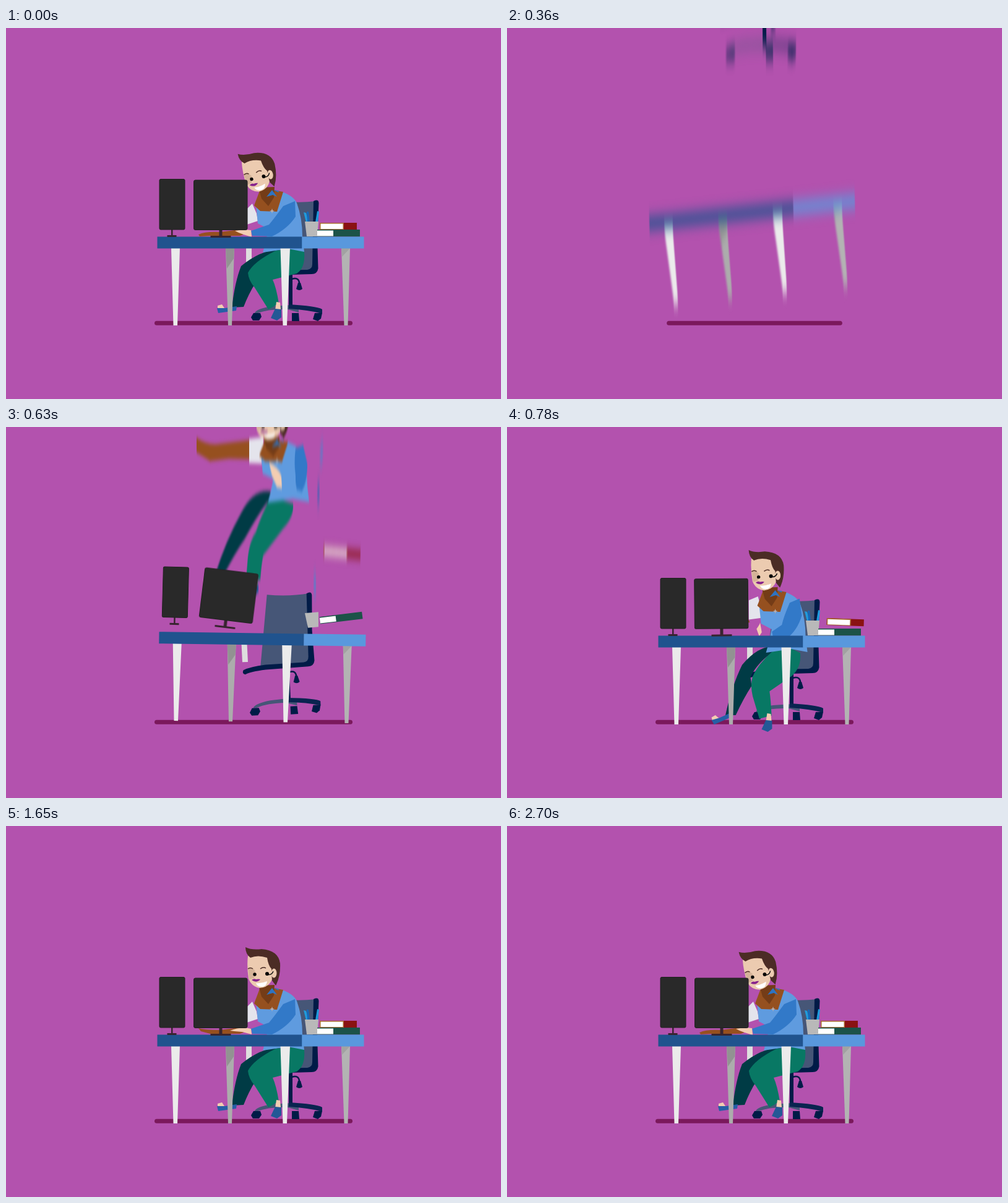
Recreate the animation shown at these times as an HTML page. Size 800 by 600 pixels, loop 2.73 s.

```html
<!DOCTYPE html>
<html lang="en">
<head>
<meta charset="utf-8">
<title>Desk drop</title>
<style>
html, body { margin: 0; width: 100%; height: 100%; overflow: hidden; background: #b352ae; }
svg { display: block; width: 100vw; height: 100vh; }
</style>
</head>
<body>
<svg viewBox="0 0 800 600">
  <rect width="800" height="600" fill="#b352ae"/>
  <path id="ground" stroke="#7b195c" stroke-width="7" stroke-linecap="round"/>

  <g id="chair">
    <path d="M388 352h9v34h-9z" fill="#dedede"/>
    <path d="M433 279Q470 284 501 280L498 394 417 394Z" fill="#465677"/>
    <path d="M497 280Q505 276 505.500 283L503 340 504.500 389Q503 398 494 398L425 400Q400 402 392 406 386 405 389 399 400 394 425 392L487 391Q495 390 495 382Z" fill="#001b47"/>
    <path d="M457 397h6v56h-6z" fill="#001b47"/>
    <path d="M462 406Q475 402 474 416" fill="none" stroke="#001b47" stroke-width="2.500"/>
    <path d="M472 412h4l3 10q-5 4-10 0z" fill="#001b47"/>
    <path d="M402 461Q404 454 430 450L460 448 473 452 473 460 455 455Q425 454 407 461Z" fill="#465677"/>
    <path d="M457 447Q505 450 511 455L511 462Q490 456 457 454Z" fill="#0a2450"/>
    <g fill="#001b47">
      <path d="M400 461h11l2 6-4 6h-10l-3-5z"/>
      <path d="M462 461h11l1 13h-12z"/>
      <path d="M499 461h12l-2 9-5 4-8-3z"/>
    </g>
  </g>

  <g id="man">
    <path id="farLeg" fill="#003b45"/>
    <g id="farFoot">
      <path d="M342 449l7-2 4 6-11 1z" fill="#f3cdb2"/>
      <path d="M341 453L354 453 373 450 372 457 343 461Z" fill="#265fa5"/>
    </g>
    <path id="nearLeg" fill="#087864"/>
    <g id="nearFoot">
      <path d="M437 443l6 1 1 11-9 1z" fill="#f3cdb2"/>
      <path d="M428 469L435 454 445 455 445 468 438 473Z" fill="#235896"/>
    </g>
    <path id="foreArm" fill="#96501f"/>
    <path id="cuff" fill="#e4e4ec"/>
    <g id="torso">
      <path d="M404 286L440 263Q464 270 470 283 479 308 479 337L482 362 456 357 415 363 420 345 424 325 407 316Z" fill="#5f9bdf"/>
      <path d="M412 258L448 265 438 297 411 296 401 287Z" fill="#95501f"/>
      <path d="M408 258L434 257 433 274 424 288 413 276Z" fill="#743c17"/>
      <path d="M421 273l9-11 8 11-7-3zM432 262l8 1 1 3z" fill="#2e74c2"/>
      <path d="M430 292l1 3 3 1-3 1-1 3-1-3-3-1 3-1z" fill="#b9b0b0"/>
    </g>
    <path id="sleeve" fill="#3279c8"/>
    <path id="hand" fill="#f3cdb2"/>
    <g id="head">
      <path d="M391 210Q408 202 429 214L430 248Q425 261 410 262 397 260 392 247Q389 227 391 210Z" fill="#eccbb0"/>
      <path d="M391 230Q400 228 403 236L401 246 393 248Z" fill="#d4b398"/>
      <path d="M387 196Q397 201 413 199 440 201 443 222 444 243 436 258L430 250 429 231Q424 226 422 213 407 208 395 213 387 207 387 196Z" fill="#4b2c25"/>
      <ellipse cx="433" cy="238" rx="4.500" ry="7.500" fill="#eccbb0"/>
      <path d="M391 231q4-3 8 0M411 231q5-4 9-1" fill="none" stroke="#4b2c25" stroke-width="1.500"/>
      <path d="M422 240q7 2 10-5" fill="none" stroke="#111" stroke-width="1.500"/>
      <circle cx="422" cy="239" r="3"/>
      <circle cx="402" cy="240" r="2.700"/>
      <path d="M397 249q4-3 7-1 4-1 7 0-6 7-14 1z" fill="#87238c"/>
      <path d="M404 254q9 1 18-3-1 9-9 9-7 0-9-6z" fill="#fff"/>
    </g>
  </g>

  <g id="pen1"><path d="M481 298l4 1 4 15h-4z" fill="#1f9bdc"/></g>
  <g id="pen2"><path d="M486 297l3 0 2 17h-4z" fill="#1667b8"/></g>
  <g id="pen3"><path d="M503 296l3 1-2 17h-4z" fill="#1f9bdc"/></g>
  <g id="cup"><path d="M483 313h22l-2 24h-17z" fill="#b9b9b9"/></g>
  <g id="green">
    <path d="M503 326h69v11.500h-69z" fill="#1c5348"/>
    <path d="M503 327.500h26v9h-26z" fill="#fff"/>
  </g>
  <g id="red">
    <path d="M507 315h60v11h-60z" fill="#8a1212"/>
    <path d="M507 315h39v11h-39z" fill="#a8662e"/>
    <path d="M508.500 316.500h36v8.500h-36z" fill="#fff"/>
  </g>

  <g id="desk">
    <path d="M355 356h14l-4 125h-6z" fill="#acacac"/>
    <path d="M355 356h14l-1 17-11 16z" fill="#929292"/>
    <path d="M542 356h14l-3.500 125h-6z" fill="#b3b3b3"/>
    <path d="M543 370l13-14-14 0z" fill="#a2a2a2"/>
    <path d="M267 356h14l-4 125h-6.500zM443.500 356h15.500l-5 125h-6.500z" fill="#ebebeb"/>
    <path d="M244.500 337.500h234v19h-234z" fill="#20538e"/>
    <path d="M478.500 337.500h100v19h-100z" fill="#5998dd"/>
  </g>
  <g id="side">
    <path d="M267 325h2.500v10h6v3h-15v-3h6.500z" fill="#38242f"/>
    <rect x="248" y="244.500" width="41" height="81.500" rx="2" fill="#292929" stroke="#202020"/>
  </g>
  <g id="screen">
    <path d="M344.500 326h5v10h14v3h-33v-3h14z" fill="#38242f"/>
    <rect x="303.500" y="246" width="86.500" height="80.500" rx="2.500" fill="#292929" stroke="#202020"/>
  </g>
</svg>
<script>
const LOOP = 2730;
const NS = 'http://www.w3.org/2000/svg';
const el = id => document.getElementById(id);
const clamp = v => Math.max(0, Math.min(1, v));
const smooth = v => v * v * (3 - 2 * v);
const ramp = (t, a, b) => smooth(clamp((t - a) / (b - a)));
const svg = document.querySelector('svg');

// Each part: pivot, motion blur strength, then keys of [time, x, y, angle].
const parts = {
  desk: { pivot: [411, 480], blur: 4, keys: [[185, -2, -542, -8.5], [373, -1, -16, -6], [450, 1, -2, 0], [540, 2, -9, 2.4], [630, 1, -4, .8], [720, 0, 0, 0]] },
  chair: { pivot: [455, 470], blur: 4, keys: [[340, -49, -490, 0], [495, -8, -10, -5], [630, -2, -9, -2.8], [750, 0, 0, 0]] },
  side: { pivot: [268, 337], blur: 4, keys: [[420, -6, -400, -6], [570, 0, -4, -2], [630, 4, -18, 1.5], [720, 1, -2, -1], [780, 0, 0, 0]] },
  screen: { pivot: [347, 337], blur: 4, keys: [[420, -6, -400, -6], [570, 2, -6, 0], [630, 7, -14, 7], [720, 0, -2, -2], [810, 0, 0, 0]] },
  man: { pivot: [430, 360], blur: 1.8, keys: [[470, 0, -565, 0], [748, 0, -5, 0], [790, 0, 3, 0], [880, 0, 0, 0]] },
  cup: { pivot: [494, 337], blur: 4, keys: [[450, 0, -430, -10], [600, 2, -16, -7], [630, 2, -13, -5], [700, 0, 0, 0]] },
  green: { pivot: [537, 331], blur: 4, keys: [[450, 8, -480, -14], [600, 3, -30, -9], [630, 4, -23, -7], [700, 0, 0, 0]] },
  red: { pivot: [537, 320], blur: 4, keys: [[480, 0, -419, 4], [680, 8, -19, 7], [720, 20, -10, 4], [840, 0, 0, 0]] },
  pen1: { pivot: [486, 312], blur: 4, keys: [[500, 20, -522, 14], [645, 12, 0, 14], [720, 0, 0, 0]] },
  pen2: { pivot: [489, 312], blur: 4, keys: [[550, 24, -490, 10], [686, 10, 0, 8], [750, 0, 0, 0]] },
  pen3: { pivot: [503, 312], blur: 4, keys: [[565, 8, -500, 6], [704, 4, 0, 4], [770, 0, 0, 0]] }
};

// Pairs of matching paths: seated, falling.
const legs = {
  nearLeg: [
    'M436 360Q400 378 391 396Q392 408 402 420L424 455L441 446Q437 420 431 407L470 397Q484 388 482 362L478 357Z',
    'M426 357Q412 385 404 410Q394 425 391 450L388 488L411 488Q413 460 416 448L448 405Q466 385 464 365L440 357Z'],
  farLeg: [
    'M443 357Q410 360 380 385Q370 410 365 452L384 451Q392 430 404 411L392 400Q400 380 440 361Z',
    'M428 345Q400 340 380 380Q355 425 338 480L352 480Q370 445 385 423L395 405Q412 375 428 355Z'],
  cuff: [
    'M398 284L389 293L389 318L407 312L405 300Z',
    'M415 257L393 260L393 299L416 300L418 280Z'],
  sleeve: [
    'M467 280L448 288Q432 310 425 318L396 328L398 336L430 337Q455 325 468 305Z',
    'M480 270L468 275Q465 300 468 318L468 330L470 342L478 345Q487 330 487 300Z']
};
const arms = {
  foreArm: [
    'M311 334Q322 329 345 330L378 326L392 331L378 336L330 336L313 337Z',
    'M311 327Q322 330 345 330L378 326L392 331L378 336L330 336L315 332Z',
    'M308 258Q325 271 345 268L393 262L393 293L360 292L330 296L308 282Z'],
  hand: [
    'M396 327Q385 325 370 328L376 331L384 334L397 338Z',
    'M396 328Q380 324 362 331L370 332L382 333L397 337Z',
    'M425 298Q440 305 445 320L446 340L438 338L430 320Z']
};

function mix(a, b, w) {
  const nums = b.match(/-?[\d.]+/g);
  let i = 0;
  return a.replace(/-?[\d.]+/g, n => +n + (nums[i++] - n) * w);
}

// Straight fall first, eased bounces afterwards.
function pose(keys, t) {
  if (t <= keys[0][0]) return keys[0].slice(1);
  const i = keys.findIndex(k => k[0] > t);
  if (i < 0) return [0, 0, 0];
  const a = keys[i - 1], b = keys[i];
  let p = (t - a[0]) / (b[0] - a[0]);
  if (i > 1) p = smooth(p);
  return [1, 2, 3].map(j => a[j] + (b[j] - a[j]) * p);
}

for (const id in parts) {
  const filter = document.createElementNS(NS, 'filter');
  const attrs = { id: 'blur-' + id, filterUnits: 'userSpaceOnUse', x: 0, y: -100, width: 800, height: 800, 'color-interpolation-filters': 'sRGB' };
  for (const k in attrs) filter.setAttribute(k, attrs[k]);
  const blur = document.createElementNS(NS, 'feGaussianBlur');
  filter.append(blur);
  svg.prepend(filter);
  // The wrapper keeps the blur vertical on stage while the part turns.
  const wrap = document.createElementNS(NS, 'g');
  const node = el(id);
  node.replaceWith(wrap);
  wrap.append(node);
  Object.assign(parts[id], { node, wrap, soft: blur });
}

function place(id, t) {
  const { keys, pivot, blur, node, wrap, soft } = parts[id];
  const [x, y, r] = pose(keys, t);
  const speed = Math.abs(pose(keys, t + 2)[1] - pose(keys, t - 2)[1]) / 4;
  const dev = speed * blur;
  node.setAttribute('transform', `translate(${x} ${y}) rotate(${r} ${pivot})`);
  wrap.setAttribute('visibility', t <= keys[0][0] ? 'hidden' : 'visible');
  if (dev > .5) {
    soft.setAttribute('stdDeviation', `0.4 ${dev}`);
    wrap.setAttribute('filter', `url(#blur-${id})`);
  } else wrap.removeAttribute('filter');
}

function draw(ms) {
  const t = ms < 30 ? 2700 : ms;
  const half = 156.5 * ramp(t, 105, 430);
  el('ground').setAttribute('d', half ? `M${400 - half} 477.300H${400 + half}` : '');
  for (const id in parts) place(id, t);

  const fall = 1 - ramp(t, 690, 860);
  const lift = .5 + .5 * Math.cos((t - 1080) / 190 * 2 * Math.PI);
  for (const id in legs) el(id).setAttribute('d', mix(...legs[id], fall));
  for (const id in arms) {
    const [flat, up, out] = arms[id];
    el(id).setAttribute('d', mix(mix(flat, up, lift), out, fall));
  }
  el('torso').setAttribute('transform', `translate(${8 * fall})`);
  el('farFoot').setAttribute('transform', `translate(${-24 * fall} ${32 * fall}) rotate(${-35 * fall} 358 454)`);
  el('nearFoot').setAttribute('transform', `translate(${-37 * fall} ${40 * fall})`);

  const dip = -8 * ramp(t, 750, 830) * (1 - ramp(t, 850, 1020));
  const nod = -10 * Math.pow(clamp((t - 2190) / 510), .8);
  el('head').setAttribute('transform', `translate(${12 * fall}) rotate(${dip + nod + 3 * fall} 425 271)`);
}

const start = performance.now();
function tick() {
  draw((performance.now() - start) % LOOP);
  requestAnimationFrame(tick);
}
tick();
</script>
</body>
</html>
```
